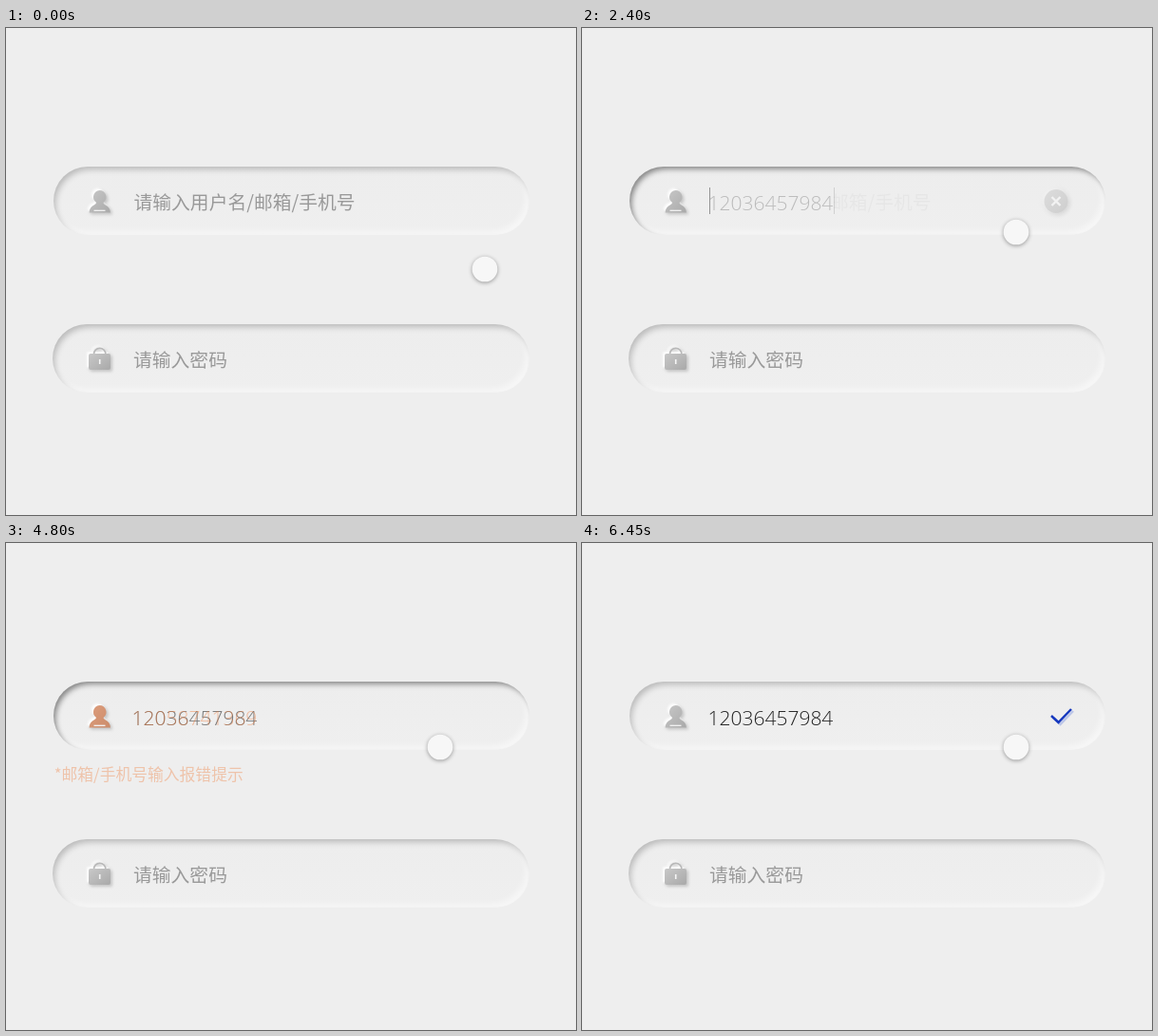
Recreate the animation shown at these times as an HTML page. Size 600 by 513 pixels, loop 6800 ms.

```html
<!DOCTYPE html>
<html lang="zh-CN">
<head>
<meta charset="utf-8">
<title>输入框状态</title>
<style>
html, body { margin: 0; width: 100%; height: 100%; overflow: hidden; background: #eee; }
.stage { position: relative; width: 600px; height: 513px; overflow: hidden; background: #eee; }
.field, .focus { position: absolute; border-radius: 36px; }
.field {
  left: 50px; top: 146px; width: 501px; height: 72px;
  background: linear-gradient(#ededed, #efefef);
  box-shadow: inset 3px 4px 6px -1px rgba(0,0,0,.22), inset -4px -4px 6px rgba(255,255,255,.5);
}
.field.pass { left: 49px; top: 312px; width: 502px; }
.focus { inset: 0; box-shadow: inset 3px 3px 5px -1px rgba(0,0,0,.27); }
svg { position: absolute; left: 0; top: 0; }

text { font-family: "Noto Sans CJK SC", "Noto Sans CJK", sans-serif; font-weight: 300; }
.hint { font-size: 19.8px; fill: #999; }
.num { font: 360 21px "Open Sans", "Noto Sans", sans-serif; fill: #222; }
.wrong { fill: #f0742e; }
.note { font-size: 16.8px; fill: #f08a50; }
.caret { stroke: #777; stroke-width: 1; }
.raised { filter: drop-shadow(-1.5px -1.5px 1px #fff) drop-shadow(2px 2px 1.5px rgba(0,0,0,.17)); }
.clear { filter: drop-shadow(-2px -2px 2px #fff) drop-shadow(2px 2px 2px rgba(0,0,0,.4)); }
.dot { filter: drop-shadow(0 1px 2px rgba(0,0,0,.38)); }
.tint { filter: blur(.8px); }

/* Values hold between keyframes; fades advance in 50 ms steps. */
.anim { animation: 6.8s step-end infinite; }
.focus { animation-name: focus; }
.prompt { animation-name: prompt; }
.c1 { animation-name: caret1; }
.c2, .clear { animation-name: typed; }
.good { animation-name: good; }
.wrong { animation-name: wrong; }
.note { animation-name: note; }
.alert { animation-name: alert; }
.tint { animation-name: tint; }
.check { animation-name: check; }
.cursor { animation-name: move; }
.dot { animation-name: press; }

@keyframes move {
  0% { transform: translate(504px, 254px); }
  1.471% {
    transform: translate(504px, 254px);
    animation-timing-function: linear(.034 0% 11.1%, .126 11.1% 22.2%, .259 22.2% 33.3%,
      .416 33.3% 44.4%, .584 44.4% 55.5%, .741 55.5% 66.6%, .874 66.6% 77.7%, .966 77.7% 88.8%, 1 88.8% 100%);
  }
  8.088%, 100% { transform: translate(457px, 215px); }
}
@keyframes press {
  0%, 18.382%, 100% { opacity: 1; }
  17.647% { opacity: .62; }
}
@keyframes focus {
  0% { opacity: 0; }
  9.559% { opacity: 1; }
  74.265% { opacity: 1; animation-timing-function: steps(7, jump-start); }
  79.412%, 100% { opacity: 0; }
}
@keyframes prompt {
  0% { opacity: 1; clip-path: inset(-5px); }
  20.588% { opacity: 1; clip-path: inset(-5px); animation-timing-function: steps(4, jump-start); }
  23.529% { opacity: .09; clip-path: inset(-5px); }
  35.294% { opacity: .09; clip-path: inset(-5px -5px -5px 131px); }
  52.941% { opacity: .09; clip-path: inset(-5px -5px -5px 131px); animation-timing-function: steps(4, jump-start); }
  55.882%, 100% { opacity: 0; clip-path: inset(-5px -5px -5px 131px); }
}
@keyframes caret1 {
  0% { opacity: 0; }
  20.588% { opacity: 0; animation-timing-function: steps(4, jump-start); }
  23.529% { opacity: 1; }
  35.294% { opacity: 1; animation-timing-function: steps(4, jump-start); }
  38.235%, 100% { opacity: 0; }
}
@keyframes typed {
  0% { opacity: 0; }
  35.294% { opacity: 0; animation-timing-function: steps(4, jump-start); }
  38.235% { opacity: 1; }
  52.941% { opacity: 1; animation-timing-function: steps(4, jump-start); }
  55.882%, 100% { opacity: 0; }
}
@keyframes good {
  0% { opacity: 0; }
  35.294% { opacity: 0; animation-timing-function: steps(4, jump-start); }
  38.235% { opacity: 1; }
  69.118% { opacity: 1; animation-timing-function: steps(7, jump-start); }
  74.265% { opacity: 0; }
  91.176% { opacity: 0; animation-timing-function: steps(6, jump-start); }
  95.588%, 100% { opacity: 1; }
}
@keyframes wrong {
  0% { opacity: 0; fill: #f0742e; }
  69.118% { opacity: 0; fill: #f0742e; animation-timing-function: steps(7, jump-start); }
  74.265% { opacity: 1; fill: #f0742e; }
  88.235% { opacity: 1; fill: #f0742e; animation-timing-function: steps(4, jump-start); }
  91.176% { opacity: 1; fill: #d4682c; animation-timing-function: steps(6, jump-start); }
  95.588%, 100% { opacity: 0; fill: #d4682c; }
}
@keyframes note {
  0% { opacity: 0; }
  69.118% { opacity: 0; animation-timing-function: steps(7, jump-start); }
  74.265% { opacity: 1; }
  91.176% { opacity: 1; animation-timing-function: steps(6, jump-start); }
  95.588%, 100% { opacity: 0; }
}
@keyframes alert {
  0% { opacity: 0; }
  69.118% { opacity: 0; animation-timing-function: steps(7, jump-start); }
  74.265% { opacity: 1; }
  88.235% { opacity: 1; animation-timing-function: steps(4, jump-start); }
  91.176%, 100% { opacity: 0; }
}
@keyframes tint {
  0% { opacity: 0; }
  88.235% { opacity: 0; animation-timing-function: steps(4, jump-start); }
  91.176% { opacity: .35; animation-timing-function: steps(6, jump-start); }
  95.588%, 100% { opacity: 0; }
}
@keyframes check {
  0% { opacity: 0; }
  88.235% { opacity: 0; animation-timing-function: steps(4, jump-start); }
  91.176% { opacity: .2; animation-timing-function: steps(6, jump-start); }
  95.588%, 100% { opacity: 1; }
}
</style>
</head>
<body>
<div class="stage">
  <div class="field"><div class="focus anim"></div></div>
  <div class="field pass"></div>

  <svg width="600" height="513" viewBox="0 0 600 513">
    <defs>
      <linearGradient id="grey" x1="0" y1="0" x2="1" y2="1">
        <stop offset="0" stop-color="#c8c8c8"/><stop offset="1" stop-color="#a9a9a9"/>
      </linearGradient>
      <linearGradient id="dark" x1="0" y1="0" x2="1" y2="1">
        <stop offset="0" stop-color="#acacac"/><stop offset="1" stop-color="#6c6c6c"/>
      </linearGradient>
      <path id="user" d="M98.500 171a7 7 0 0 1 4.300 12.500c-.6 1.200.2 1.900 1.700 2.700 3.400 1.700 5.300 4.200 5.400 8.300H87.600c.1-4.100 2-6.600 5.400-8.300 1.500-.8 2.300-1.500 1.700-2.700A7 7 0 0 1 98.500 171z"/>
      <path id="tick" d="M494 182l7.500 7 13.500-14" fill="none" stroke-width="2.500"/>
    </defs>

    <use href="#user" class="tint anim" fill="#f96a1e" transform="translate(2 2)"/>
    <g class="raised">
      <use href="#user" fill="url(#grey)"/>
      <use href="#user" class="alert anim" fill="#fa6519"/>
    </g>
    <path d="M92.500 192.300h12" stroke="#f4f4f4" stroke-width="1.300"/>

    <g class="raised">
      <path d="M92.500 344v-.5a6.200 6.200 0 0 1 12.400 0v.5" fill="none" stroke="#b8b8b8" stroke-width="1.600"/>
      <rect x="87" y="343" width="23" height="17" rx="2" fill="url(#grey)"/>
    </g>
    <path d="M98.700 349v5" stroke="#f6f6f6" stroke-width="1.600"/>

    <text class="hint prompt anim" x="134.500" y="190.500">请输入用户名/邮箱/手机号</text>
    <text class="hint" x="134" y="356.500">请输入密码</text>
    <text class="num good anim" x="132.500" y="191.500">12036457984</text>
    <text class="num wrong anim" x="132.500" y="191.500">12058741369</text>
    <text class="note anim" x="50.700" y="250.300">*邮箱/手机号输入报错提示</text>
    <path class="caret c1 anim" d="M134.500 168v28"/>
    <path class="caret c2 anim" d="M265.500 168v28"/>

    <g class="clear anim">
      <circle cx="499" cy="182.500" r="12.500" fill="url(#dark)"/>
      <path d="M494.500 178l9 9m0-9l-9 9" stroke="#fff" stroke-width="2.400"/>
    </g>

    <g class="check anim">
      <use href="#tick" stroke="#bcc6e8" transform="translate(2 2)"/>
      <use href="#tick" stroke="#1638be"/>
    </g>

    <g class="cursor anim">
      <circle class="dot anim" r="13.300" fill="#f7f7f7"/>
    </g>
  </svg>
</div>
</body>
</html>
```
